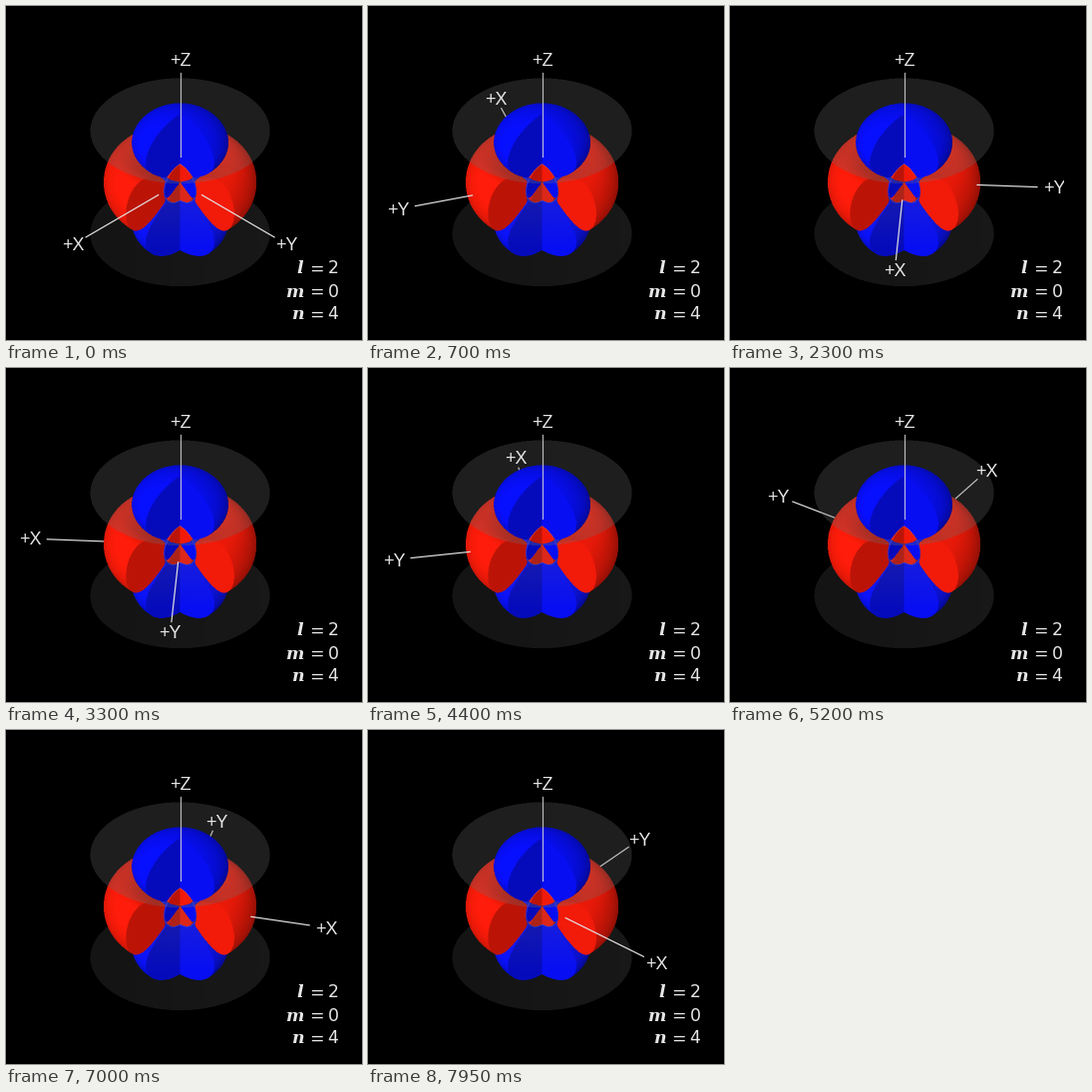
Animation of 357x335 px, one loop 8000 ms. Source, as a matplotlib script:

```python
import numpy as np
import matplotlib.pyplot as plt
from matplotlib.animation import FuncAnimation
from matplotlib.transforms import Bbox

W, H, DPI = 357, 335, 100
CX, CY = 174.6, 176.8
TILT = np.arcsin(0.587)
SIN, COS = np.sin(TILT), np.cos(TILT)
SCALE, LEVEL = 3.75, 0.22          # pixels per radial unit, isosurface level
RIM = 90                           # nodal cone rim radius
LIGHT = np.array([-0.4, 0.65, 0.64])
FRAMES, INTERVAL = 160, 50


def psi(x, y, z):
    """Wave function with n = 4, l = 2, m = 0, up to a constant."""
    r2 = x * x + y * y + z * z
    rho = np.sqrt(r2) / SCALE
    return (3 * z * z - r2) / SCALE**2 * (rho - 6) * np.exp(-rho / 2)


def place(sx, up, depth):
    return sx, depth * COS - up * SIN, up * COS + depth * SIN


def in_wedge(x, y):
    return y > np.abs(x)


def surface_normal(x, y, z):
    e = 0.5
    g = np.array([psi(x + e, y, z) - psi(x - e, y, z),
                  psi(x, y + e, z) - psi(x, y - e, z),
                  psi(x, y, z + e) - psi(x, y, z - e)])
    g *= -np.sign(psi(x, y, z))
    return g / (np.linalg.norm(g, axis=0) + 1e-9)


def render(ss=2):
    """Ray-march the cut orbital and blend the two nodal cones over it."""
    px = (np.arange(W * ss) + 0.5) / ss - CX
    py = CY - (np.arange(H * ss) + 0.5) / ss
    sx, up = (a.ravel() for a in np.meshgrid(px, py))
    depth = np.full(sx.size, np.nan)
    on_face = np.zeros(sx.size, bool)

    live = np.flatnonzero((np.abs(sx) < 80) & (np.abs(up) < 83))
    step = 0.5
    for d in np.arange(92, -92, -step):
        x, y, z = place(sx[live], up[live], d)
        hit = (np.abs(psi(x, y, z)) > LEVEL) & ~in_wedge(x, y)
        ids = live[hit]
        depth[ids] = d
        _, y0, _ = place(sx[ids], up[ids], d + step)
        on_face[ids] = in_wedge(sx[ids], y0)
        live = live[~hit]

    solid = np.flatnonzero(~np.isnan(depth))
    x, y, z = place(sx[solid], up[solid], depth[solid])
    n = surface_normal(x, y, z)
    face = on_face[solid]
    n[:, face] = np.array([-np.sign(x), np.ones_like(x), 0 * x])[:, face] / np.sqrt(2)
    shade = np.clip(0.67 + 0.38 * (LIGHT @ n), 0.45, 1)
    base = np.where(psi(x, y, z)[:, None] > 0, (0.03, 0.06, 1.0), (1.0, 0.11, 0.04))

    rgb = np.zeros((sx.size, 3))
    alpha = np.zeros(sx.size)
    rgb[solid] = base * shade[:, None]
    alpha[solid] = 1

    # cones: the upper one veils what lies outside it, the lower one its inside
    rise = RIM / np.sqrt(2) * COS
    inside = np.zeros(sx.size, bool)
    inside[solid] = 2 * z * z > x * x + y * y
    side = sx / RIM
    fade = np.where(alpha == 1, np.clip(1 + up / 65, 0, 1), 1)
    for sign, veil in ((1, 0.29 + 0 * side), (-1, (0.21 + 0.02 * side) * fade)):
        mouth = side**2 + ((up - sign * rise) / (RIM * SIN))**2 < 1
        seen = mouth & ((alpha == 0) | (inside == (sign < 0)))
        v = np.where(seen, veil, 0)
        rgb = rgb * (1 - v[:, None]) + 0.42 * v[:, None]
        alpha = alpha * (1 - v) + v

    out = np.dstack([rgb.reshape(H * ss, W * ss, 3), alpha.reshape(H * ss, W * ss)])
    out = out.reshape(H, ss, W, ss, 4).mean(axis=(1, 3))
    out[..., :3] /= np.maximum(out[..., 3:], 1e-6)
    return np.clip(out, 0, 1)


fig = plt.figure(figsize=(W / DPI, H / DPI), dpi=DPI, facecolor="black")
ax = fig.add_axes([0, 0, 1, 1])
ax.axis("off")
ax.imshow(render(), extent=(0, W, H, 0), interpolation="nearest", zorder=2)
ax.set_xlim(0, W)
ax.set_ylim(H, 0)


def label(x, y, s, size=13, **kw):
    kw = {"family": "Liberation Sans", "ha": "center", **kw}
    return ax.text(x, y, s, fontsize=size, color="#e6e6e6", zorder=5, **kw)


# edge of the radial node on both cut faces
theta = np.linspace(0, np.pi, 60)
node = 6 * SCALE
for s in (-1, 1):
    ax.plot(CX + s * node * np.sin(theta) / np.sqrt(2),
            CY - node * (np.cos(theta) * COS - np.sin(theta) * SIN / np.sqrt(2)),
            color="#b0b0c8", lw=0.5, alpha=0.25, zorder=3)

ax.plot([CX, CX], [67, 151], color="#d8d8d8", lw=0.85, alpha=0.85, zorder=4)
label(CX, 60.5, "+Z")

for row, (name, value) in enumerate((("l", 2), ("m", 0), ("n", 4))):
    y = 268.5 + 23 * row
    label(298.5, y, name, 12.5, family="DejaVu Serif", style="italic",
          weight="bold", ha="right")
    label(311, y, "=", 12.5, family="DejaVu Sans")
    label(328, y, str(value), 12.5, family="DejaVu Sans")

clip = Bbox.from_bounds(0, 0, 335, H)
axes3 = []
for name, turn in (("+X", 0), ("+Y", 90)):
    line, = ax.plot([], [], color="#e4e4e4", lw=0.85)
    text = label(CX, CY, name, clip_on=True)
    text.set_clip_box(clip)
    axes3.append((line, text, turn))


def spin(t):
    """Angle of +X from the viewer; the turn slows down steadily."""
    return -45 - 722 * (1 - np.exp(-0.253 * t))


def update(i):
    for line, text, turn in axes3:
        deg = (spin(i * INTERVAL / 1000) + turn + 180) % 360 - 180
        a = np.radians(deg)
        dx, dy = 151 * np.sin(a), 88 * np.cos(a)
        start = 0.205 if abs(deg) < 52 else 0.487
        k = np.array([start, 0.885])
        line.set_data(CX + k * dx, CY + k * dy)
        line.set_zorder(4 if dy > 0 else 1)
        text.set_position((CX + dx, CY + dy + 6.2))
    return [artist for line, text, _ in axes3 for artist in (line, text)]


anim = FuncAnimation(fig, update, frames=FRAMES, interval=INTERVAL,
                     repeat=True, repeat_delay=0, blit=False)
plt.show()
```
